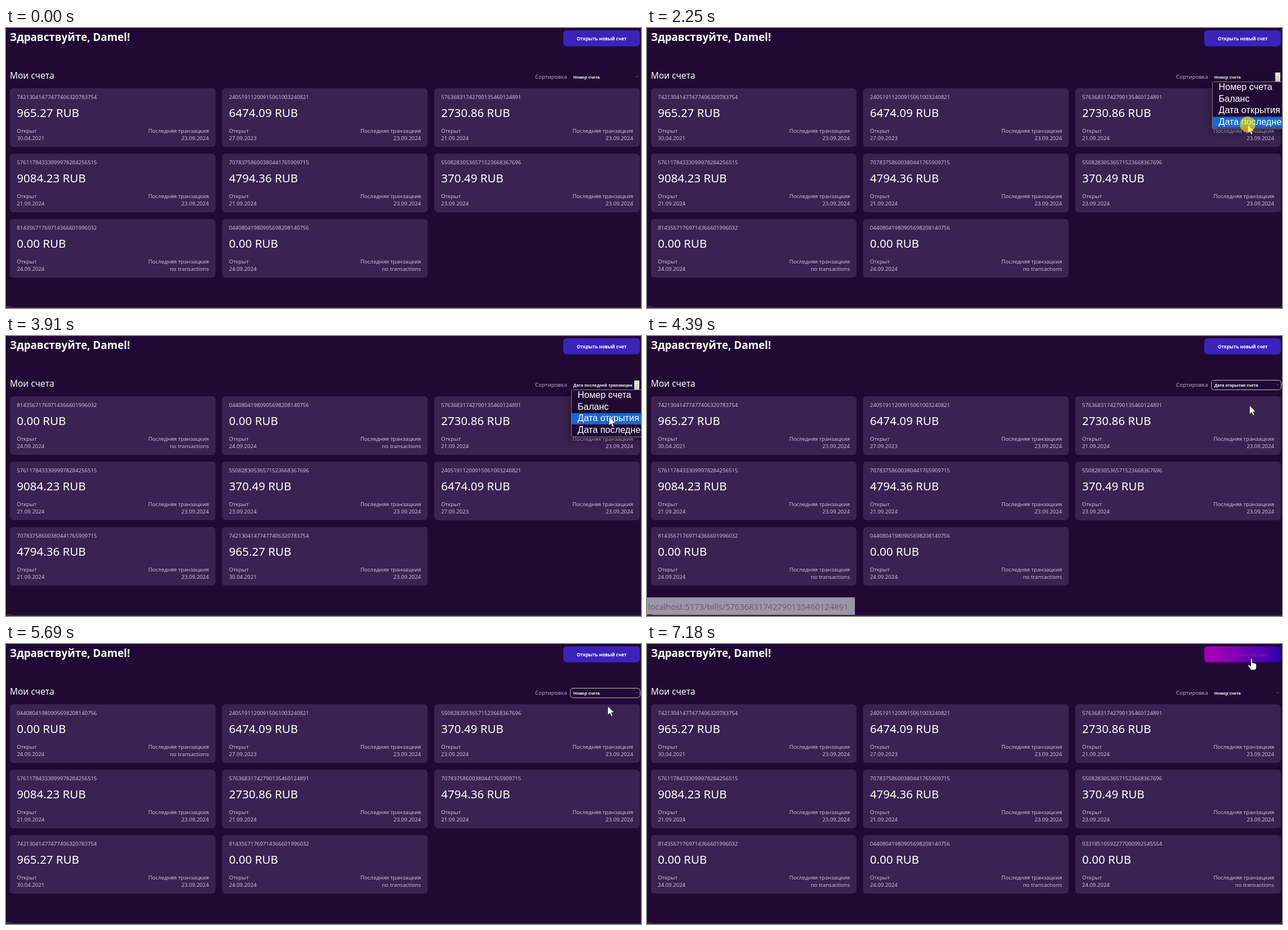
These frames come from a looping animation (1127x497 px, 8 s). An HTML page:

```html
<!DOCTYPE html>
<html lang="ru">
<head>
<meta charset="utf-8">
<title>Мои счета</title>
<style>
html, body { margin: 0; width: 100%; height: 100%; overflow: hidden; background: #200a34; }
svg { display: block; width: 1127px; height: 497px; font: 500 9.55px "Noto Sans", sans-serif; }
.select { font: bold 7.55px "Liberation Sans", Arial, sans-serif; }
.menu { font: 16.2px "Liberation Sans", Arial, sans-serif; }
.shadow { filter: drop-shadow(0 3px 7px rgba(0, 0, 0, .5)); }
.status { font: 14.7px "Open Sans", sans-serif; }
</style>
</head>
<body>
<svg id="stage" viewBox="0 0 1127 497"></svg>
<script>
const LOOP = 8000, LAG = 70;
const stage = document.getElementById('stage');

// number, balance, opened, last transaction, rank of the last transaction
const accounts = [
  ['74213041477477406320783754', '965.27', '30.04.2021', '23.09.2024', 6],
  ['24051911200915061003240821', '6474.09', '27.09.2023', '23.09.2024', 4],
  ['57636831742790135460124891', '2730.86', '21.09.2024', '23.09.2024', 1],
  ['57611784333099978284256515', '9084.23', '21.09.2024', '23.09.2024', 2],
  ['70783758600380441765909715', '4794.36', '21.09.2024', '23.09.2024', 5],
  ['55082830536571523668367696', '370.49', '23.09.2024', '23.09.2024', 3],
  ['81435671769714366601996032', '0.00', '24.09.2024', 'no transactions', 0],
  ['04408041980905698208140756', '0.00', '24.09.2024', 'no transactions', 0]
];
const added = ['93318510592277000992545554', '0.00', '24.09.2024', 'no transactions', 0];

const options = ['Номер счета', 'Баланс', 'Дата открытия счета', 'Дата последней транзакции'];
const byField = i => [...accounts].sort((a, b) => a[i] < b[i] ? -1 : a[i] > b[i] ? 1 : 0);
// the list is already sorted by opening date
const sorted = [byField(0), byField(1), accounts, byField(4)];

// click on the select, click on an option, its index
const picks = [[1170, 2250, 3], [3080, 4110, 2], [4880, 5620, 0]];
const ADD = 6990;
const clicks = [...picks.flatMap(p => p.slice(0, 2)), ADD];

// start, end, x, y
const moves = [
  [190, 1030, 1037, 82], [1400, 1920, 1066, 171], [2420, 3010, 1068, 87],
  [3220, 3910, 1070, 143], [4250, 4850, 1068, 87], [4950, 5220, 1068, 110],
  [6130, 6310, 1073, 26]
];
// when the link bar appears and is gone
const links = [[330, 1040], [2390, 2900], [4300, 4880], [5760, 6340]];

const mix = (a, b, k) => a + (b - a) * k;
const clamp = (v, lo, hi) => Math.min(hi, Math.max(lo, v));
const progress = (t, a, b) => clamp((t - a) / (b - a), 0, 1);

function pointer(t) {
  let x = 985, y = 500;
  for (const [a, b, toX, toY] of moves) {
    const k = Math.sin(progress(t, a, b) * Math.PI / 2);
    x = mix(x, toX, k);
    y = mix(y, toY, k);
  }
  return [x, y];
}

const text = (x, y, s, fill, more = '') => `<text x="${x}" y="${y}" fill="${fill}" ${more}>${s}</text>`;
const rect = (x, y, w, h, fill, more = '') =>
  `<rect x="${x}" y="${y}" width="${w}" height="${h}" fill="${fill}" ${more}/>`;

function card([number, sum, opened, last], i) {
  const x = 7 + i % 3 * 376.5, y = 107 + Math.floor(i / 3) * 116;
  const left = x + 12.3, right = x + 353, end = 'text-anchor="end"', soft = '#cfbbe0';
  return rect(x, y, 364.8, 104, '#3a2350', 'rx="6"') +
    text(left, y + 19.3, number, soft) +
    text(left, y + 51.3, sum + ' RUB', '#fff', 'font-size="20.5"') +
    text(left, y + 79, 'Открыт', soft) +
    text(left, y + 91.5, opened, soft) +
    text(right, y + 79, 'Последняя транзацкия', soft, end) +
    text(right, y + 91.5, last, soft, end);
}

function button(t) {
  // on hover a blue-magenta-blue band twice as wide as the button slides left
  const x = 989 - 136 * progress(t, 6310, 6580);
  return `<linearGradient id="band" gradientUnits="userSpaceOnUse" x1="${x}" x2="${x + 272}">
      <stop stop-color="#4400b0"/><stop offset=".25" stop-color="#8000b4"/>
      <stop offset=".55" stop-color="#a200b8"/><stop offset="1" stop-color="#3000b0"/></linearGradient>` +
    rect(989, 4, 136, 28.5, t < 6250 ? '#3b23b9' : 'url(#band)', 'rx="6"') +
    text(1057.3, 21.5, 'Открыть новый счет', t < ADD + LAG ? '#fff' : '#9c08b0',
      'text-anchor="middle" font-size="8.1" font-weight="700"');
}

function select(chosen, ring, hover) {
  return text(939, 90, 'Сортировка', '#bba8cf', 'font-size="9.7"') +
    text(1007, 89.6, options[chosen], '#fff', 'class="select"') +
    (hover ? rect(1115, 79, 9, 16, '#e6e4e8') : '') +
    `<path d="M1117.5 85.5l2 2 2-2" fill="none" stroke="${hover ? '#aaa' : '#6a597f'}"/>` +
    (ring ? rect(1001.5, 78.5, 124, 17, 'none', 'rx="5" stroke="#bdb8bd"') : '');
}

function menu(active) {
  const row = 20.7;
  return `<g class="shadow">${rect(1003.5, 95.5, 130, 83.5, '#200a34', 'rx="2" stroke="#85808a"')}</g>` +
    rect(1004, 95.5 + active * row, 123, 20, '#1967d2') +
    options.map((s, i) => text(1014.5, 110 + i * row, s, '#fff', 'class="menu"')).join('');
}

function status(t, number) {
  const alpha = Math.max(...links.map(([a, b]) => clamp(Math.min(t - a, b - t) / 140, 0, 1)));
  return `<g class="status" opacity="${alpha}">${rect(0, 464, 369, 31, '#dee1e6')}` +
    text(2, 486, 'localhost:5173/bills/' + number, '#55585d', `opacity="${alpha}"`) + '</g>';
}

function cursor(x, y) {
  const shape = y < 36
    ? 'M-1.5 1Q0-1 1.5 1V8Q3 6.5 4.2 8.2Q6 7.2 6.8 9Q8.6 8.6 8.6 10.6V14Q8.4 17 7 20H-1.5Q-3 16.5-6.3 13Q-7.2 10.6-4.6 11L-1.5 13.2Z'
    : 'M0 0V16.2L3.8 12.8L6.4 18.4L9 17.2L6.5 11.8H11.4Z';
  return `<path transform="translate(${x} ${y})" d="${shape}" fill="#fff" stroke="#15101c" stroke-width=".8"/>`;
}

function scene(t) {
  const [x, y] = pointer(t);
  const done = t >= ADD + LAG;
  const last = picks.filter(p => t >= p[1] + LAG).pop();
  const chosen = last ? last[2] : 0;
  const list = done ? [...accounts, added] : last ? sorted[chosen] : accounts;
  const open = picks.some(([a, b]) => t >= a + LAG && t < b + LAG);
  const hover = x > 1001 && y > 78 && y < 96;
  const active = y < 96 ? chosen : clamp(Math.floor((y - 95.5) / 20.7), 0, 3);
  const click = clicks.some(c => t >= c && t < c + LAG);
  return text(7, 23, 'Здравствуйте, Damel!', '#fff', 'font-size="18.8" font-weight="700"') +
    button(t) +
    text(7, 90.3, 'Мои счета', '#fff', 'font-size="15.4"') +
    list.map(card).join('') +
    select(chosen, last && !open && !done, hover || open) +
    (open ? menu(active) : '') +
    status(t, list[2][0]) +
    rect(0, 495, 1127, 2, '#2b2731') +
    rect(1, 494, 9, 1, done ? '#7a0a90' : '#54434f') +
    cursor(x, y) +
    (click ? `<circle cx="${x}" cy="${y}" r="14" fill="#ffeb00" opacity=".6"/>` : '');
}

let shown = '';
function draw(now) {
  const next = scene(now % LOOP);
  if (next !== shown) stage.innerHTML = shown = next;
  requestAnimationFrame(draw);
}
draw(performance.now());
</script>
</body>
</html>
```
